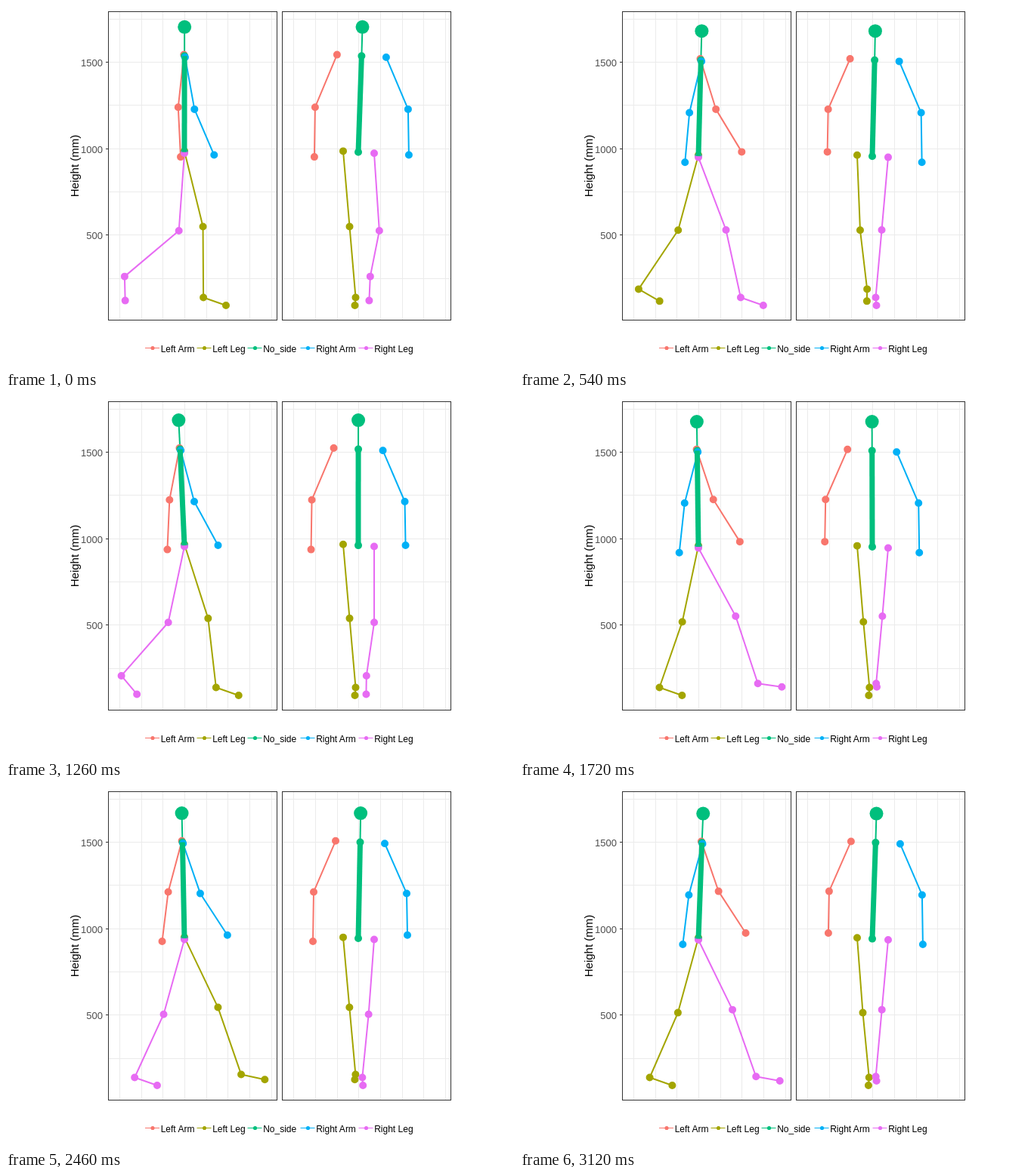
These frames come from a looping animation (672 px wide and 480 px high, 3140 ms). An HTML page:

```html
<!DOCTYPE html>
<html lang="en">
<head>
<meta charset="utf-8">
<title>Walking figure</title>
<style>
  html, body { margin: 0; width: 100%; height: 100%; overflow: hidden; background: #fff; }
  svg { display: block; font-family: "Liberation Sans", Arial, sans-serif; }
  path { fill: none; }
</style>
</head>
<body>
<svg id="stage" width="672" height="480" viewBox="0 0 672 480"></svg>
<script>
const LOOP = 3140, STEP = 20, STRIDE = 1335;
const HIP_X = 236, MID = 466.5;          // body axis in the side and back views
const GROUND = 397, ANKLE_GROUND = 386.5;
const RED = '#F8766D', OLIVE = '#A3A500', GREEN = '#00BF7D', BLUE = '#00B0F6', PINK = '#E76BF3';
const stage = document.getElementById('stage');

function add(tag, attrs, text = '') {
  const el = document.createElementNS('http://www.w3.org/2000/svg', tag);
  for (const k in attrs) el.setAttribute(k, attrs[k]);
  el.textContent = text;
  stage.append(el);
  return el;
}
const line = (d, stroke) => add('path', { d, stroke });

// Chart
const gridX = (panel, i) => Math.floor(150.4 + panel * 230.2 + i * 28.7) + 0.5;
const gridY = i => Math.floor(17.3 + i * 57.3) + 0.5;
for (const panel of [0, 1]) {
  const left = 135.5 + panel * 230;
  for (let i = 0; i < 8; i++) line(`M${gridX(panel, i)} 8V416`, '#EBEBEB');
  for (let i = 0; i < 7; i++) line(`M${left} ${gridY(i)}h223`, '#EBEBEB');
  add('rect', { x: left, y: 7.5, width: 223, height: 409, fill: 'none', stroke: '#333' });
}
[1500, 1000, 500].forEach((mm, i) => {
  const y = gridY(1 + 2 * i);
  line(`M132 ${y}h3`, '#333');
  add('text', { x: 128, y: y + 5, 'font-size': 13, 'text-anchor': 'end', fill: '#4D4D4D' }, mm);
});
add('text', { transform: 'translate(96 212) rotate(-90)', 'font-size': 15, 'text-anchor': 'middle' }, 'Height (mm)');
[['Left Arm', 194, RED], ['Left Leg', 262.5, OLIVE], ['No_side', 329.5, GREEN],
 ['Right Arm', 399.5, BLUE], ['Right Leg', 476.5, PINK]].forEach(([name, x, color]) => {
  line(`M${x - 10} 453.5h19`, color);
  add('circle', { cx: x, cy: 453.5, r: 2.6, fill: color });
  add('text', { x: x + 10.7, y: 458.5, 'font-size': 12 }, name);
});

// Gait: p counts strides, each limb is a chain of bones swinging by degrees from straight down
const wave = (p, size, peak, freq = 1) => size * Math.cos(2 * Math.PI * freq * (p - peak));
const bump = (p, at, width) => Math.exp(-(((p - Math.floor(p) - at) / width) ** 2));
// A joint has x in the side view, x in the back view (b) and the shared height y
function bone(from, length, degrees, b) {
  const a = degrees * Math.PI / 180;
  return { x: from.x + length * Math.sin(a), y: from.y + length * Math.cos(a), b };
}

function leg(p, side, pelvis) {
  const lift = bump(p, 0.56, 0.13);
  const out = (base, size) => MID + side * (base + size * lift);
  const thigh = 7.7 + wave(p, 20.7, 0.821) + wave(p, 5, 0.173, 2);
  const shin = -13.5 + wave(p, 27, 0.939) + wave(p, 13.3, 0.295, 2) + wave(p, 3.6, 0.083, 3);
  const droop = 21 + 72 * bump(p, 0.52, 0.08) - 17 * bump(p, 0.81, 0.04);
  const hip = { x: HIP_X, y: pelvis.y + side * 1.4, b: out(20.5, 0) };
  const knee = bone(hip, 103, thigh, out(12, 19));
  const ankle = bone(knee, 94, shin, out(4, 14));
  ankle.y = Math.min(ankle.y, ANKLE_GROUND);
  const toe = bone(ankle, 32, 90 - droop, out(5, 11));
  toe.y = Math.min(toe.y, GROUND);
  return [hip, knee, ankle, toe];
}

function arm(p, side, neck) {
  const shoulder = { x: neck.x + side * 0.8, y: neck.y + side * 1.7, b: neck.b + side * 32.5 };
  const elbow = bone(shoulder, 70, 2 + wave(p, 17, 0.33), shoulder.b + side * 29);
  const hand = bone(elbow, 66, 13 + wave(p, 20, 0.335), elbow.b + side);
  return [shoulder, elbow, hand];
}

function pose(t) {
  const p = t / STRIDE, drift = Math.cos(2 * Math.PI * t / LOOP);
  const lean = 4 * drift - 1 + wave(p, 3.5, 0.4), sway = 2.5 + 3 * drift;
  const pelvis = { x: HIP_X, y: 195.2 + 3 * t / LOOP - wave(p, 4.5, 0.1, 2), b: 466 };
  const neck = { x: HIP_X + 0.75 * lean, y: pelvis.y - 127.5, b: 466 + 0.8 * sway };
  const head = { x: HIP_X + lean, y: neck.y - 38.5, b: 466 + sway };
  return {
    leftArm: arm(p, -1, neck), leftLeg: leg(p, -1, pelvis),
    spine: [head, neck], trunk: [neck, pelvis], skull: [head],
    rightArm: arm(p + 0.5, 1, neck), rightLeg: leg(p + 0.5, 1, pelvis)
  };
}

// Layers in order: thin lines, dots (round caps on empty segments), trunk, head
const parts = [];
function part(name, stroke, width, dots = false) {
  for (const axis of ['x', 'b']) {
    const el = add('path', { stroke, 'stroke-width': width,
      'stroke-linecap': dots ? 'round' : 'butt', 'stroke-linejoin': 'round' });
    parts.push({ el, name, axis, dots });
  }
}
const limbs = { leftArm: RED, leftLeg: OLIVE, spine: GREEN, rightArm: BLUE, rightLeg: PINK };
for (const name in limbs) part(name, limbs[name], 2);
for (const name in limbs) part(name === 'spine' ? 'trunk' : name, limbs[name], 10, true);
part('trunk', GREEN, 7);
part('skull', GREEN, 18, true);

function draw() {
  const joints = pose(Math.floor(performance.now() % LOOP / STEP) * STEP);
  for (const { el, name, axis, dots } of parts) {
    const points = joints[name].map(j => `${j[axis].toFixed(2)} ${j.y.toFixed(2)}`);
    el.setAttribute('d', dots ? points.map(s => `M${s}h.01`).join('') : 'M' + points.join('L'));
  }
  requestAnimationFrame(draw);
}
draw();
</script>
</body>
</html>
```
